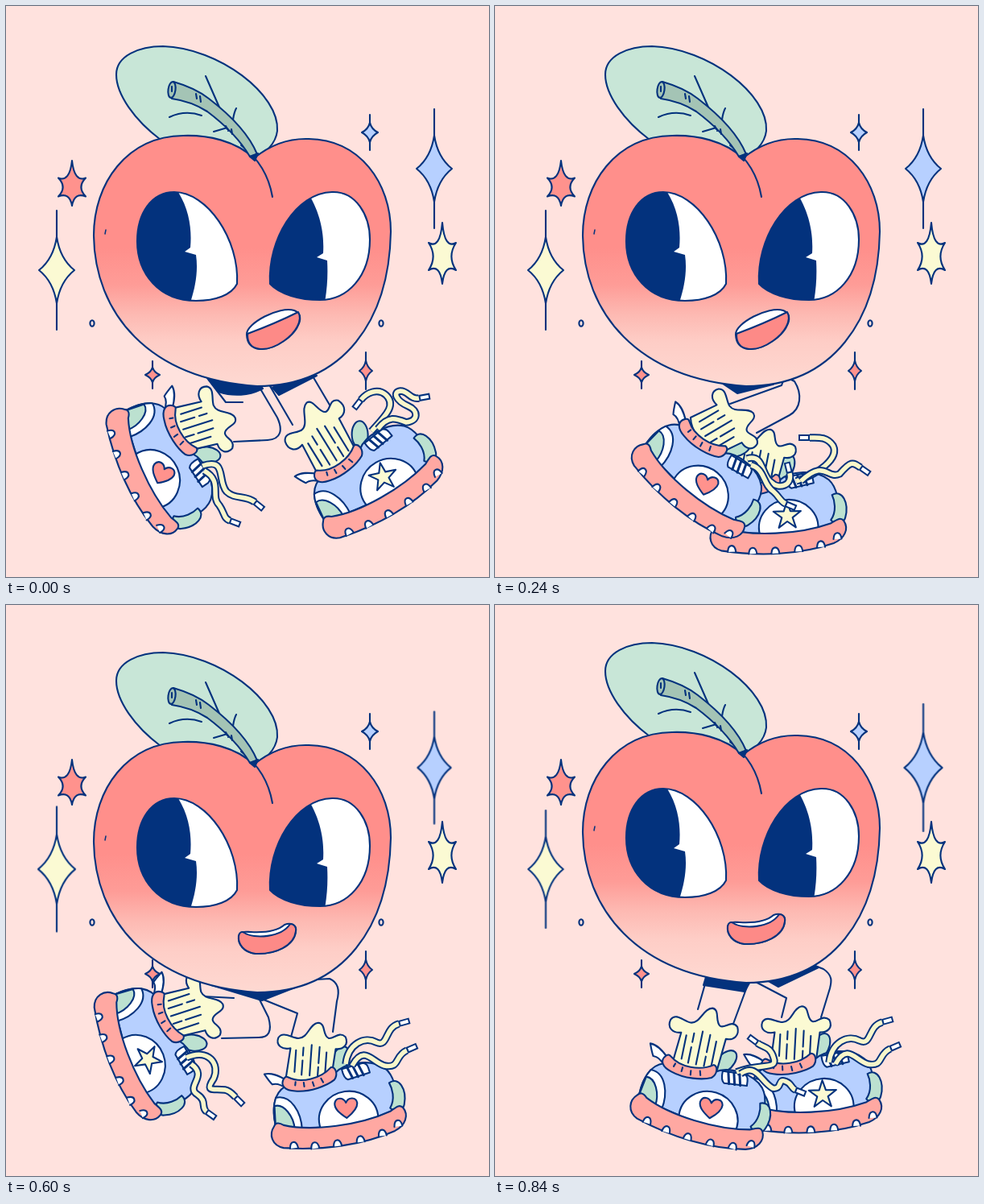
Write an HTML page that moves like this. It is 600 px wide and 709 px high and loops after 0.96 s.

```html
<!DOCTYPE html>
<html lang="en">
<head>
<meta charset="utf-8">
<title>Walking peach</title>
<style>
  html, body { margin: 0; width: 100%; height: 100%; overflow: hidden; background: #ffe2de; }
  svg { display: block; width: 100%; height: 100%; }
  .ink { stroke: #03327d; stroke-width: 2.1; stroke-linecap: round; stroke-linejoin: round; fill: none; }
  .ink * { vector-effect: non-scaling-stroke; }
  .skin { fill: #ffe2de; }
  .navy { fill: #03327d; }
  .red { fill: #ff928d; }
  .sole { fill: #ffa8a2; }
  .coral { fill: #fd8a87; }
  .blue { fill: #b7d0ff; }
  .green { fill: #bce1d0; }
  .leaf { fill: #c8e6d7; }
  .stem { fill: #a4c4b5; }
  .yellow { fill: #fbfad3; }
  .white { fill: #fff; }
  .lace { stroke-width: 9.5; stroke-linecap: butt; }
  .laceFill { stroke: #f8f6ca; stroke-width: 5.5; stroke-linecap: butt; }
</style>
</head>
<body>
<svg viewBox="0 0 600 709">
  <defs>
    <linearGradient id="blush" gradientUnits="userSpaceOnUse" x1="0" y1="300" x2="0" y2="472">
      <stop offset="0" stop-color="#ff8f8b"/>
      <stop offset=".27" stop-color="#fe9c97"/>
      <stop offset=".48" stop-color="#fdb9b2"/>
      <stop offset=".68" stop-color="#fecdc6"/>
      <stop offset="1" stop-color="#fed9d2"/>
    </linearGradient>
    <marker id="tip" markerUnits="userSpaceOnUse" markerWidth="18" markerHeight="12" refX="1" refY="6" orient="auto">
      <rect x="2" y="3" width="12" height="6" fill="#fff" stroke="#03327d" stroke-width="2"/>
    </marker>
    <clipPath id="leftEye"><path id="eyeL" d="M163,292C163,257 181,231 209,231C250,231 290,290 287,345C280,359 260,366 236,366C190,366 163,332 163,292Z"/></clipPath>
    <clipPath id="rightEye"><path id="eyeR" d="M328,345C325,290 360,232 405,231C435,230 452,260 452,290C452,335 425,365 390,365C365,365 340,358 328,345Z"/></clipPath>
  </defs>
  <g id="sparkles" class="ink"></g>
  <g id="walk" class="ink"></g>
  <g id="body" class="ink">
    <path class="leaf" d="M192,166C160,142 137,110 137,85C137,62 165,50 195,50C265,52 340,110 337,155C335,172 322,182 308,190Z"/>
    <path d="M248,87L266,128M286,127C280,138 284,149 276,155M203,138C218,131 232,132 243,136M258,156L275,151"/>
    <path fill="url(#blush)" d="M308,189C285,167 250,160 220,161C150,162 109,220 109,285C110,380 176,463 312,472C420,472 476,390 478,280C478,220 440,166 376,165C348,164 325,175 308,189Z"/>
    <path d="M292,173C312,188 326,208 331,237"/>
    <path class="stem" d="M208,94C222,98 238,104 252,115C282,138 303,162 312,184L303,187C290,165 270,146 250,131C236,122 220,117 206,115Z"/>
    <ellipse class="stem" cx="206" cy="104" rx="4.5" ry="10" transform="rotate(8 206 104)"/>
    <path d="M236,109L237,115M241,112L242,119M273,149L275,153M280,153L281,159M206,100V106"/>
    <path class="navy" d="M303,187L313,183L309,192Z"/>
    <path d="M124,278L123,283" stroke-width="1.5"/>
    <g clip-path="url(#leftEye)">
      <path class="navy" d="M160,228H290V368H160Z"/>
      <path class="white" d="M212,228C228,252 231,278 229,300L222,305L236,309C239,330 235,350 229,368H295V228Z" stroke="none"/>
    </g>
    <g clip-path="url(#rightEye)">
      <path class="navy" d="M324,228H455V368H324Z"/>
      <path class="white" d="M374,230C394,262 395,290 394,307L386,312L399,316C400,335 399,350 396,368H460V228Z" stroke="none"/>
    </g>
    <use href="#eyeL"/><use href="#eyeR"/>
    <g id="open">
      <path class="white" d="M299,408C298,394 340,372 358,378C372,384 364,403 345,416C325,430 300,431 299,408Z"/>
      <path class="coral" d="M300,407Q335,394 363,380C369,390 360,406 345,416C325,430 299,431 300,407Z"/>
    </g>
    <g id="smile">
      <path class="white" d="M289,402C291,395 299,397 304,397C322,398 338,395 346,388C354,385 361,388 360,396C358,414 335,425 310,424C295,422 288,412 289,402Z"/>
      <path class="coral" d="M289,402C290,397 293,396 296,398C308,406 342,404 353,387C358,387 361,391 360,396C358,414 335,425 310,424C295,422 288,412 289,402Z"/>
    </g>
  </g>
</svg>
<script>
const LOOP = 960, STEPS = 8;
const byId = id => document.getElementById(id);
const shape = (cls, d, extra = '') => `<path class="${cls}" d="${d}" ${extra}/>`;
const place = (x, y, angle, inner) => `<g transform="translate(${x} ${y}) rotate(${angle})">${inner}</g>`;

// Holds each value for one step of the loop.
function hold(el, property, values) {
  const frames = [...values, values[0]].map((v, i) => ({ [property]: v, offset: i / STEPS, easing: 'step-end' }));
  el.animate(frames, { duration: LOOP, iterations: Infinity }).startTime = 0;
}

// Four-pointed sparkle whose upper and lower tips thin out into a line.
const diamond = (w, h) => {
  const spike = h * .56, a = w * .12, b = h * .32, c = w * .45, e = h * .13;
  return `M0,${-h}V${-spike}C${a},${-b} ${c},${-e} ${w},0C${c},${e} ${a},${b} 0,${spike}V${h}V${spike}` +
    `C${-a},${b} ${-c},${e} ${-w},0C${-c},${-e} ${-a},${-b} 0,${-spike}Z`;
};
const sixPoint = (w, up, down) => {
  const side = down * .5;
  const tips = [[0, -up], [w, -side], [w, side], [0, down], [-w, side], [-w, -side]];
  return 'M' + tips[0] + tips.map(([x, y], i) => {
    const [nx, ny] = tips[(i + 1) % 6];
    return `Q${(x + nx) * .17},${(Math.max(y, -down) + Math.max(ny, -down)) * .17} ${nx},${ny}`;
  }).join('') + 'Z';
};

byId('sparkles').innerHTML =
  place(82, 225, 0, shape('red', sixPoint(17, 33, 23))) +
  place(542, 311, 0, shape('yellow', sixPoint(17, 42, 34))) +
  place(452, 157, 0, shape('blue', diamond(10, 22))) +
  place(182, 458, 0, shape('red', diamond(9, 17))) +
  place(447, 453, 0, shape('red', diamond(8, 23))) +
  place(532, 202, 0, `<g id="bigBlue">${shape('blue', diamond(22, 74))}</g>`) +
  place(63, 328, 0, `<g id="bigYellow">${shape('yellow', diamond(22, 74))}</g>`) +
  [107, 466].map(x => `<ellipse cx="${x}" cy="394" rx="2.6" ry="3.8"/>`).join('');

const star = 'M' + Array.from({ length: 10 }, (_, i) => {
  const r = i % 2 ? 7 : 18, a = i * Math.PI / 5 - Math.PI / 2;
  return [r * Math.cos(a), r * Math.sin(a)].map(v => v.toFixed(1));
}).join('L') + 'Z';
const badges = {
  star: shape('yellow', star),
  heart: shape('red', 'M0,13C-8,7 -15,1 -14,-6C-12,-14 -3,-13 0,-6C3,-13 13,-13 14,-5C14,2 7,8 0,13Z')
};

const sock = length => `<g transform="scale(1 ${length})">` +
  shape('yellow', 'M-28,2L-25,-34C-35,-31 -44,-36 -41,-46C-36,-55 -25,-47 -16,-47C-4,-48 -4,-66 7,-68C17,-68 13,-53 21,-50C27,-48 33,-60 42,-53C47,-44 41,-37 31,-37L28,0C14,8 -14,10 -28,2Z') +
  shape('', 'M-18,-5V-32M-9,-2V-20M-9,-26V-36M1,-2V-40M11,-2V-13M11,-18V-38M20,-4V-32') + '</g>';

const treads = [[25, 23], [51, 27], [79, 28], [108, 27], [136, 23], [157, 14]]
  .map(([x, y]) => shape('white', `M${x - 5},${y}C${x - 4},${y - 10} ${x + 4},${y - 10} ${x + 5},${y}`)).join('');

// Side view of a shoe: heel at the origin, sole along x.
function shoe(x, y, angle, badge, tilt, sockX = 55, sockLength = 1) {
  return place(x, y, angle,
    shape('white', 'M27,-62C18,-69 10,-74 1,-73C4,-67 6,-63 9,-59C15,-60 20,-57 25,-52Z') +
    `<ellipse class="green" cx="97" cy="-78" rx="10" ry="17" transform="rotate(28 97 -78)"/>` +
    place(sockX, -62, tilt, sock(sockLength)) +
    shape('blue', 'M6,-8C4,-30 10,-48 24,-54L88,-62C102,-74 135,-74 150,-60C160,-50 162,-30 158,-6C110,6 50,6 6,-8Z') +
    shape('white', 'M11,-42C30,-44 40,-20 38,2L6,-8C5,-22 7,-34 11,-42Z') +
    shape('green', 'M8,-32C20,-34 30,-16 29,0L6,-8Z') +
    shape('white', 'M61,4C56,-20 76,-38 97,-38C118,-38 138,-20 133,4') +
    place(96, -18, -angle * .6, badges[badge]) +
    shape('green', 'M153,-41C166,-48 174,-30 168,-12C166,-4 152,-6 150,-10C158,-20 156,-34 153,-41Z') +
    shape('sole', 'M4,-7C-4,2 -2,16 12,21C60,31 110,31 152,19C166,14 172,2 166,-8C162,-14 156,-9 150,-6C110,6 50,6 16,-7C10,-12 6,-11 4,-7Z') +
    treads +
    shape('sole', 'M24,-64C18,-56 24,-49 36,-47C54,-43 76,-48 86,-54C92,-60 90,-70 84,-70C70,-58 45,-55 30,-65C27,-67 26,-66 24,-64Z') +
    shape('', 'M38,-58L37,-54M48,-56V-51M59,-55L60,-50M70,-58L72,-53') +
    shape('white', 'M97,-66L124,-70Q129,-69 130,-63L131,-57L103,-52Q98,-54 97,-66Z') +
    shape('', 'M104,-67L109,-53M111,-68L116,-54M118,-69L123,-55', 'stroke-width="3"'));
}
const laces = (...paths) => paths.map(d => shape('lace', d) + shape('laceFill', d, 'marker-end="url(#tip)"')).join('');
const landedLaces = laces(
  'M422,570C425,545 445,535 460,543C475,550 470,525 488,520',
  'M430,572C445,545 455,568 470,572C490,576 482,560 498,553');

const poses = [
  (a, b) =>
    shape('skin', 'M294,492L273,492L250,462L314,472L337,511C344,526 342,538 325,539L283,541') +
    shape('navy', 'M252,464L264,479C282,485 302,484 319,475L312,466Z') +
    shoe(139, 500, 66.3, a, 6) +
    laces('M244,571C275,560 262,590 274,603C284,613 298,607 309,616', 'M246,577C270,590 253,608 265,620C272,630 270,636 278,639') +
    shape('skin', 'M356,520L328,472L380,458L403,497') +
    shape('navy', 'M331,474L339,483L386,459L370,452Z') +
    shoe(394, 648, -29.7, b, -2, 55, 1.22) +
    laces('M454,528C470,510 486,496 472,483C462,474 448,480 441,489', 'M462,525C475,508 485,512 497,517C513,515 512,502 500,497C484,490 480,479 490,478C500,478 502,489 513,487'),
  (a, b) =>
    shape('skin', 'M283,488L245,486L226,465L310,480L326,512C331,530 326,537 314,537L268,538') +
    shape('skin', 'M353,540L362,507L315,488L385,465L402,464C416,470 413,485 411,492L406,530') +
    shape('navy', 'M255,472L318,491L387,464L320,470Z') +
    shoe(125, 481, 69, a, 3) +
    laces('M224,562C252,550 266,570 258,588C246,606 258,600 272,602C278,603 282,608 285,611', 'M230,570C252,585 222,598 238,608C250,616 242,624 249,629') +
    shoe(330, 655, -7.9, b, 12) + landedLaces,
  (a, b) =>
    shoe(268, 656, -3, b, 14, 57) +
    laces('M374,590C400,582 428,562 420,546C412,534 400,536 391,536', 'M380,590C410,562 412,588 428,581C442,565 444,566 454,573') +
    shape('skin', 'M292,494L356,471L360,460L372,466C382,482 380,500 366,508L325,530') +
    shape('navy', 'M277,465L301,481L345,470L362,460Z') +
    shoe(177, 547, 39.5, a, 20) +
    laces('M313,562C335,555 330,584 344,592C352,600 370,596 366,580', 'M318,570C336,575 332,594 346,603C354,610 354,615 361,618'),
  (a, b) =>
    shape('skin', 'M356,512L362,488L320,466L395,447L408,452C420,460 418,468 416,476L405,512') +
    shape('navy', 'M338,466L352,474L402,450L385,442Z') +
    shoe(312, 631, -3, b, 6, 62) +
    `<g transform="translate(-7 -2)">${landedLaces}</g>` +
    shape('skin', 'M252,502L264,460L316,466L296,520') +
    shape('navy', 'M262,462L259,472L310,480L318,466Z') +
    shoe(171, 614, 16.7, a, -5, 62, 1.1) +
    laces('M300,580C330,568 352,578 346,562C342,548 334,550 326,544', 'M305,582C325,568 330,592 345,600C358,602 350,586 362,592C368,594 368,600 373,602')
];

const rearBadge = ['heart', 'heart', 'heart', 'star', 'star', 'star', 'star', 'heart'];
const other = { heart: 'star', star: 'heart' };
byId('walk').innerHTML = rearBadge.map((name, i) => `<g>${poses[i % 4](name, other[name])}</g>`).join('');
const during = test => Array.from({ length: STEPS }, (_, i) => test(i) ? 'visible' : 'hidden');
[...byId('walk').children].forEach((pose, step) => hold(pose, 'visibility', during(i => i === step)));
hold(byId('open'), 'visibility', during(i => i < 4));
hold(byId('smile'), 'visibility', during(i => i >= 4));

const bounce = [0, 9, 0, -3];
hold(byId('body'), 'transform', [...bounce, ...bounce].map(y => `translate(0px, ${y}px)`));
const scales = list => list.map(h => `scale(${h / 74})`);
hold(byId('bigBlue'), 'transform', scales([74, 70, 74, 79, 74, 69.5, 74, 79]));
hold(byId('bigYellow'), 'transform', scales([74, 81, 74, 73, 74, 77.5, 74, 73]));
</script>
</body>
</html>
```
